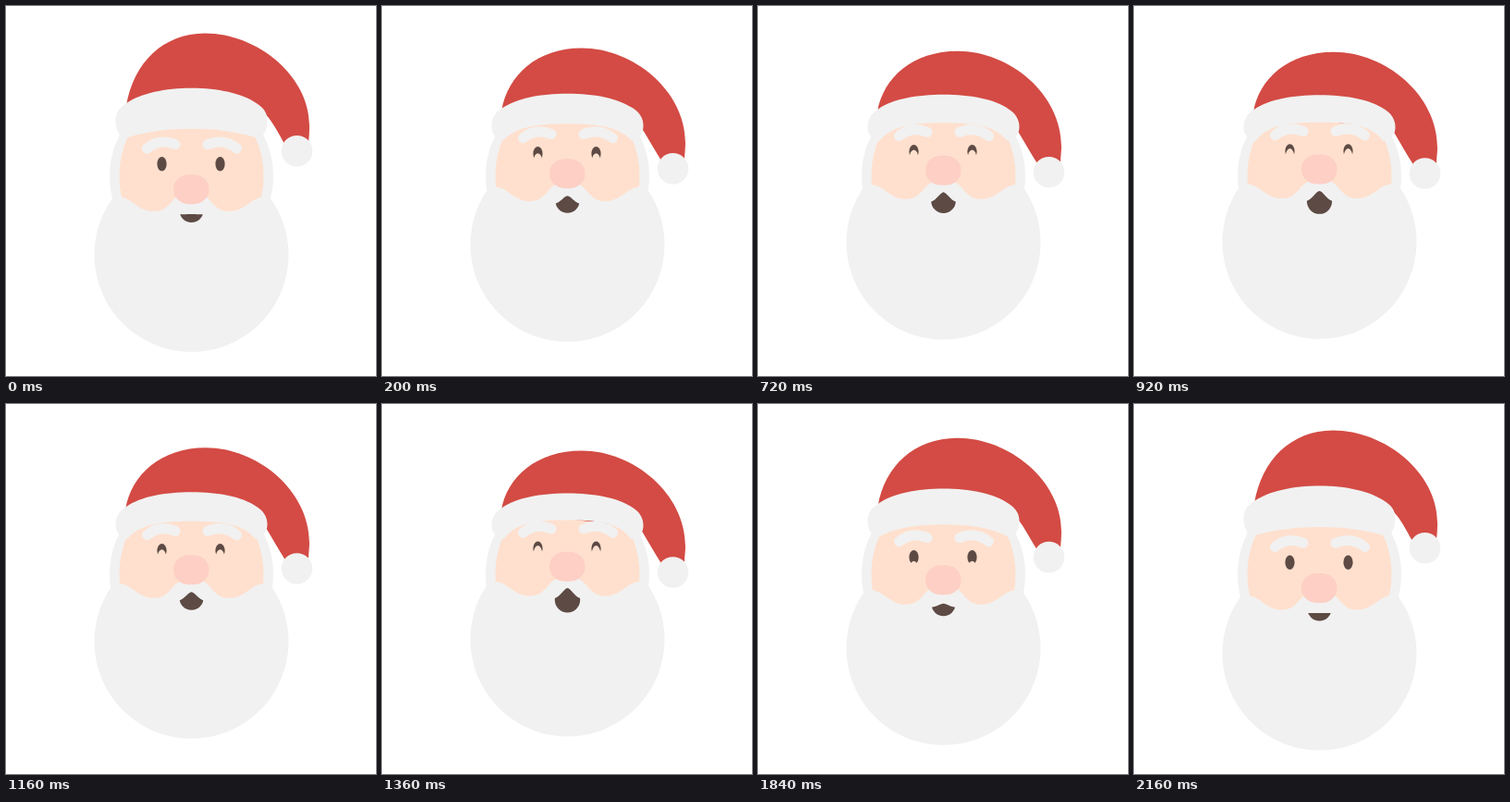
Animation, 400 px wide and 400 px high, one loop 3080 ms. Source, as an HTML page:

```html
<!DOCTYPE html>
<html lang="en">
<head>
<meta charset="utf-8">
<title>Laughing Santa</title>
<style>
  html, body { margin: 0; width: 100%; height: 100%; overflow: hidden; background: #fff; }
  svg { display: block; width: 100%; height: 100%; }
  .white { fill: #f1f1f1; }
  .skin { fill: #ffe0ce; }
  .red { fill: #d34b44; }
  .dark { fill: #5d4a44; }
  .brow { fill: none; stroke: #f1f1f1; stroke-width: 11; stroke-linecap: round; }
</style>
</head>
<body>
<svg viewBox="0 0 400 400">
  <defs>
    <clipPath id="lips"><path id="lipLine"/></clipPath>
  </defs>
  <ellipse class="white" cx="200.5" cy="184" rx="88.5" ry="93"/>
  <ellipse class="skin" cx="200.5" cy="184" rx="78" ry="90"/>
  <path id="hat" class="red"/>
  <circle id="ball" class="white" cx="314.5" cy="155.8" r="16.8"/>
  <path id="brim" class="white"/>
  <g id="eyes" class="dark">
    <ellipse cx="168.5" cy="171.3" rx="5.1" ry="7.7"/>
    <ellipse cx="231.5" cy="171.3" rx="5.1" ry="7.7"/>
  </g>
  <g id="cheeks" class="skin">
    <ellipse cx="168.5" cy="189.2" rx="4.9" ry="9.5"/>
    <ellipse cx="231.5" cy="189.2" rx="4.9" ry="9.5"/>
  </g>
  <g id="brows" class="brow">
    <path d="M152.5 154.5Q166 143.2 183 150.3"/>
    <path d="M249.5 154.5Q235 143.2 218 150.3"/>
  </g>
  <path id="beard" class="white"
    d="M116.1 207C136 204 140 222.5 160 222.5C178 222.5 178 206 192 203L200.5 207L209 203
       C223 206 223 222.5 241 222.5C261 222.5 265 204 284.9 207A105 105 0 1 1 116.1 207Z"/>
  <g clip-path="url(#lips)"><circle id="mouth" class="dark" cx="200.5"/></g>
  <rect id="nose" x="181" y="183" width="38.5" height="32" rx="17" ry="15.5" fill="#fdcfc5"/>
</svg>
<script>
const LOOP = 3080, STEP = 40, LEAD = 40;
const $ = id => document.getElementById(id);

// Each shape at rest and with the head thrown fully back.
const shapes = {
  hat: [
    "M130 108C138 60 170 29 215 28.6C272 28.6 328 75 328 128C328 134 328 138 327 147L301 148C295 138 289 125 281 117Z",
    "M129 115C135 79 167 50.6 216 50.6C272 50.6 328 97 328 154C328 160 327 165 327 173L303 174C295 162 288 149 279 134Z"
  ],
  brim: [
    "M128 143C121 140 118.5 132 118.5 123C118.5 116 122 110 130 105C146 94 172 88.5 200.5 88.5" +
    "C229 88.5 255 94 271 105C279 110 282.5 116 282.5 123C282.5 132 280 140 273 143C251 136 226 133 200.5 133C175 133 150 136 128 143Z",
    "M132 146C121 143 118.5 138 118.5 131C118.5 124 122 117 130 112C146 101 172 96.5 200.5 96.5" +
    "C229 96.5 255 101 271 112C279 117 282.5 124 282.5 131C282.5 138 280 143 269 146C259 131 241 125.5 200.5 125.5C160 125.5 142 131 132 146Z"
  ],
  lipLine: [
    "M183 226C191 226 195 226 199 226Q200.5 226 202 226C206 226 210 226 218 226L218 245L183 245Z",
    "M183 210.5C191 211.5 195 202 199 199.6Q200.5 198.3 202 199.6C206 202 210 211.5 218 210.5L218 245L183 245Z"
  ]
};

// Vertical travel of the rigid parts.
const shifts = { ball: 26.2, eyes: -15, cheeks: -26.6, brows: -15.3, beard: -15, nose: -23.3 };

// Lean over time: [ms, amount]; LEAD ms have passed when the loop begins.
const keys = [
  [0, 0], [350, 1], [630, .82], [885, 1], [1140, .82],
  [1395, 1], [1610, .82], [2190, 0], [LOOP, 0]
];

const smooth = x => x * x * (3 - 2 * x);

function lean(time) {
  const t = (time + LEAD) % LOOP;
  const i = keys.findIndex(k => k[0] > t);
  const [t0, a] = keys[i - 1], [t1, b] = keys[i];
  let x = (t - t0) / (t1 - t0);
  if (b === 0) x = 1 - (1 - x) ** 1.2; // softer landing
  return a + (b - a) * smooth(x);
}

function mix([from, to], p) {
  const ends = to.match(/[\d.]+/g);
  let i = 0;
  return from.replace(/[\d.]+/g, n => (+n + (ends[i++] - n) * p).toFixed(2));
}

function draw(time) {
  const p = lean(time);
  for (const id in shapes) $(id).setAttribute("d", mix(shapes[id], p));
  for (const id in shifts) $(id).setAttribute("transform", `translate(0 ${(shifts[id] * p).toFixed(2)})`);

  const open = Math.max(0, (p - .84) / .16);
  const r = 13 + .7 * open;
  $("mouth").setAttribute("r", r);
  $("mouth").setAttribute("cy", 234.5 - 14 * p + 5 * open - r);
}

const start = performance.now();
function tick() {
  const t = (performance.now() - start) % LOOP;
  draw(Math.floor(t / STEP) * STEP);
  requestAnimationFrame(tick);
}
tick();
</script>
</body>
</html>
```
